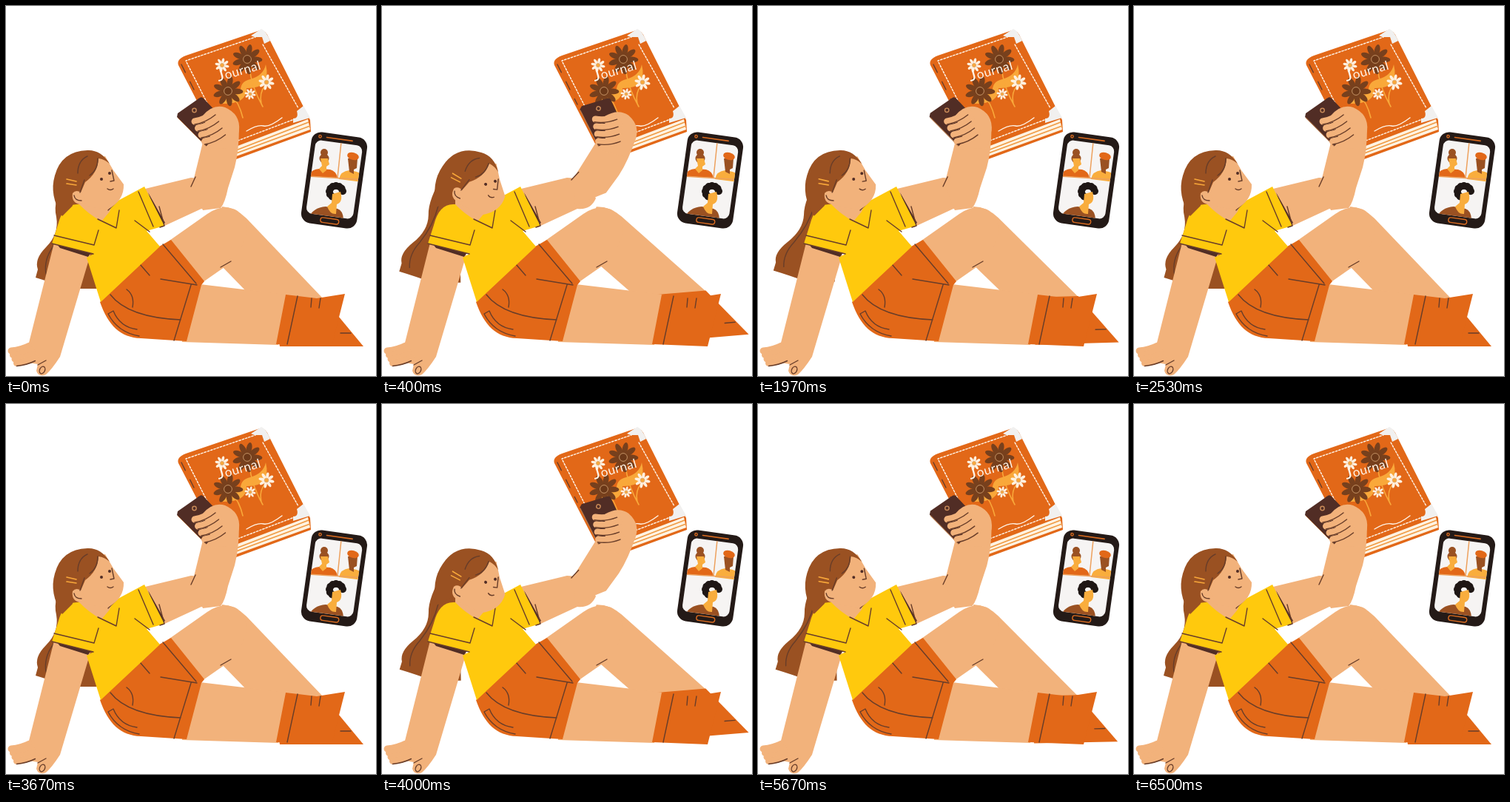
These frames come from a looping animation (500x500 px, 7.21 s). An HTML page:

```html
<!DOCTYPE html>
<html lang="en">
<head>
<meta charset="utf-8">
<title>Journal</title>
<style>
html, body { margin: 0; width: 100%; height: 100%; overflow: hidden; background: #fff; }
svg { display: block; width: 100vw; height: 100vh; }
.skin { fill: #f2b27b; }
.orange { fill: #e26818; }
.yellow { fill: #ffc90d; }
.amber { fill: #f9ad3d; }
.hair { fill: #9a5122; }
.dark { fill: #512d25; }
.line, .white, .gold, .finger { fill: none; stroke-linecap: round; stroke-linejoin: round; }
.line { stroke: #683d29; stroke-width: 1.4; }
.white { stroke: #fff4e8; stroke-width: 1.4; }
.gold { stroke: #f9a83a; stroke-width: 1.6; }
.rust { stroke: #d96b20; }
.finger { stroke: #f2b27b; stroke-width: 9; }
</style>
</head>
<body>
<svg viewBox="0 0 500 500">
  <defs>
    <clipPath id="screen"><rect x="-32" y="-51" width="64" height="100" rx="8" transform="translate(443.500 235.500) rotate(8)"/></clipPath>
  </defs>

  <!-- journal -->
  <path class="orange" d="M233 80Q230 72 243 67L343 33Q351 32 355 43L411 154L412 170L311 207L290 190Z"/>
  <path fill="#fff3e2" d="M300 194L408 153L411 167L303 206Z"/>
  <path fill="none" stroke="#ef9a42" stroke-width="1.500" d="M303 198L409 157M303 202L411 162"/>
  <path class="line" stroke-dasharray="12 14" d="M237 79L264 133"/>
  <path class="white" stroke-dasharray="2.500 2" d="M298 183L243 74L337 42M347 52L395 138M387 154L300 187"/>
  <path fill="#f1f0ef" d="M331 40L345 31Q351 33 357 47L349 51L346 42L336 42ZM388 158V152Q396 152 393 142L402 135L411 151Z"/>
  <path fill="#f9a83a" d="M317 116Q316 102 330 99Q348 94 351 79Q359 112 325 111Q326 133 291 132Q298 112 317 116Z"/>
  <path class="gold" d="M329 82Q331 108 347 136M304 120Q315 130 320 151M350 108Q342 117 345 132"/>
  <g id="flowers"></g>
  <text transform="translate(287 102) rotate(-16)" font-family="Lato, sans-serif" font-size="17" letter-spacing=".5" fill="#fff4e8"><tspan font-size="24">J</tspan>ournal</text>
  <path class="white" d="M325 169Q340 160 348 162T373 151"/>

  <!-- video call -->
  <g transform="translate(443.500 235.500) rotate(8)">
    <rect x="-38" y="-62" width="76" height="124" rx="13" fill="#241a17"/>
    <rect x="-32" y="-51" width="64" height="100" rx="8" fill="#f6f4f3"/>
    <path class="gold rust" d="M-18-56H17"/>
    <circle class="line rust" cx="-27" cy="-56" r="1.700"/>
    <rect class="line rust" x="-11" y="52" width="25" height="6.500" rx="3.200"/>
  </g>
  <g clip-path="url(#screen)">
    <path class="orange" d="M408 230Q414 219 425 220L438 221Q446 223 448 232Z"/>
    <circle class="hair" cx="430" cy="198" r="5"/>
    <circle class="hair" cx="430" cy="206" r="6.500"/>
    <path class="amber" d="M425 206H435L437 214L433 217V222L428 226L423 220L427 216Z"/>
    <path class="amber" d="M450 234Q452 223 464 222L474 224Q483 227 483 238Z"/>
    <path class="hair" d="M462 206H475L474 219L470 221V227L464 224Z"/>
    <ellipse class="orange" cx="469" cy="203" rx="8" ry="5" transform="rotate(15 469 203)"/>
    <path d="M453 184L448 232M408 230L486 235" stroke="#eda05c" stroke-width="1.500"/>
    <path class="hair" d="M405 294Q412 272 432 271L448 274Q457 277 456 294Z"/>
    <g id="curls" fill="#1f1715"></g>
    <path class="amber" d="M441 254L452 251Q456 265 447 268L446 281Q438 282 434 271L440 266Z"/>
  </g>

  <path id="mane" class="hair"/>
  <path id="strand" class="line"/>

  <!-- legs -->
  <g id="calf">
    <path class="skin" d="M275 320L292 271Q310 272 325 287L430 397L358 420L290 350Z"/>
    <path class="orange" d="M358 396H430L483 460H370Z"/>
    <path class="line" d="M452 442H466"/>
  </g>
  <path class="skin" d="M218 319L272 281Q294 266 313 277Q340 303 305 346L262 376L380 390L368 458L238 454V376Z"/>
  <path class="orange" d="M378 390L420 395L458 389L440 460L365 457Z"/>
  <path class="line" d="M290 353L304 345M394 392L380 457M413 395L412 407M425 395L423 408"/>

  <!-- supporting arm -->
  <path class="skin" d="M65 320L114 336L73 474Q62 491 54 498Q44 502 41 493L43 484L20 480L31 455Z"/>
  <g id="restingHand"></g>
  <path class="line" d="M43 485L54 479"/>
  <ellipse class="line" cx="49" cy="492" rx="3.500" ry="5" transform="rotate(25 49 492)"/>
  <path class="dark" d="M68 321L115 333L111 339L73 327Z"/>

  <!-- upper arm, shorts and shirt -->
  <path class="skin" d="M188 247L250 232Q278 232 289 260Q282 276 264 274L210 299Z"/>
  <path class="dark" d="M192 252L215 293L208 298Z"/>
  <path class="orange" d="M207 325L223 316L268 372L264 377L244 453L182 449C155 448 138 432 127 400Z"/>
  <path class="line" d="M212 322L257 375M250 377L227 452M181 349L194 364M209 369L258 377M141 390Q165 421 236 424M163 383Q174 391 171 407M138 416L145 412Q154 434 177 437M138 416Q151 441 180 446"/>
  <path class="yellow" d="M62 321L70 296Q77 268 96 268L144 267L187 244L214 297L190 304L208 325L128 400L109 340L118 335Z"/>
  <path class="line" d="M65 310L119 323L125 303M179 251L199 298M174 290L194 305M207 271L214 297L208 299M62 321L118 335"/>
  <path class="skin" d="M99 262L147 258L140 278L129 291Q111 281 99 268Z"/>
  <path class="line" d="M124 288L149 300L153 276M149 265L138 276"/>

  <!-- head -->
  <g id="head">
    <path class="skin" d="M95 212L134 203L145 222L159 241Q160 263 137 275L105 271L90 256Z"/>
    <path class="hair" d="M76 284Q58 256 66 229Q75 196 110 195Q128 194 140 213Q133 207 125 206Q124 226 107 238L101 252L88 257L90 270Z"/>
    <path class="skin" d="M103 253Q95 247 90 253Q88 265 99 268L108 266Z"/>
    <path class="line" d="M102 263Q93 263 92 256M100 252L106 235M124 206Q124 222 113 229M110 203Q97 209 97 226M143 222L146 236L141 237M137 247Q141 250 145 247"/>
    <path class="gold" d="M82 234L95 237M82 240L95 242"/>
    <circle class="dark" cx="129" cy="234" r="2"/>
    <circle class="dark" cx="140" cy="226" r="2"/>
  </g>

  <!-- raised arm -->
  <g id="forearm">
    <path id="elbow" class="skin"/>
    <path class="line" d="M250 244L256 231"/>
    <path class="dark" d="M232 145L262 124Q265 122 268 126L306 166L276 191Q273 193 270 189L231 150Z"/>
    <path d="M232 151L272 191" stroke="#b77a4c"/>
    <circle class="line" cx="254.500" cy="141" r="2.700" style="stroke:#c98a58"/>
    <path class="skin" d="M266 194L278 182L266 148Q280 132 296 137Q317 146 315 168L309 192Z"/>
    <g id="raisedHand"></g>
  </g>
</svg>
<script>
const $ = id => document.getElementById(id);
const { sin, cos, min, max, PI } = Math;

function flower(x, y, r, n, color, heart) {
  let petals = '';
  for (let i = 0; i < n; i++)
    petals += `<ellipse cy="${-r * .6}" rx="${r * .19}" ry="${r * .42}" transform="rotate(${i * 360 / n + 12})"/>`;
  return `<g transform="translate(${x} ${y})" fill="${color}">${petals}<circle r="${r * .27}" fill="${heart}" stroke="#d9a877" stroke-width=".8"/></g>`;
}
const brown = (x, y) => flower(x, y, 20, 9, '#77401d', '#6b3818');
const cream = (x, y, r) => flower(x, y, r, 8, '#fff1df', '#f9a83a');
$('flowers').innerHTML = brown(326, 72) + brown(300, 115) +
  cream(292, 80, 9.5) + cream(352, 103, 10.5) + cream(330, 119, 7.5);

for (let a = 2.2; a < 6.4; a += .5)
  $('curls').innerHTML += `<circle cx="${446 + 9 * cos(a)}" cy="${251 + 8 * sin(a)}" r="5"/>`;

// Four stacked fingers, each with a crease along its lower side
function fingers(x, y, stepX, stepY, dx, dy) {
  let out = '';
  for (let i = 0; i < 4; i++) {
    const d = `M${x + i * stepX} ${y + i * stepY}q${dx * .55} ${dy * .2} ${dx} ${dy}`;
    out += `<path class="finger" d="${d}"/><path class="line" d="${d}" transform="translate(0 4)"/>`;
  }
  return out;
}
$('restingHand').innerHTML = fingers(7, 466, 2.5, 5.5, 25, -7);
$('raisedHand').innerHTML = fingers(255, 156, 4.5, 9, 28, -13);

// Hair hangs from the head; lower points swing further
function drawMane(swing) {
  const p = (x, y) => {
    const drop = min(1, max(0, (y - 268) / 90)) ** .7;
    return `${x - 50 * swing * drop} ${y - 25 * max(0, swing) * drop} `;
  };
  $('mane').setAttribute('d', `M${p(84, 225)}Q${p(62, 262)}${p(68, 285)}Q${p(72, 308)}${p(54, 326)}` +
    `Q${p(38, 342)}${p(43, 356)}L${p(40, 367)}Q${p(60, 373)}${p(85, 382)}L${p(123, 382)}L${p(118, 330)}L112 240Z`);
  $('strand').setAttribute('d', `M76 270Q${p(78, 300)}${p(63, 326)}Q${p(51, 343)}${p(54, 362)}`);
}

const CYCLE = 3605, START = 70, MOVE = 2830;

function draw(now) {
  const t = min(MOVE, max(0, now % CYCLE - START)), p = t / MOVE;
  const fade = (1 - p) ** 3;
  const arm = 29 * fade * sin(2 * PI * t / 1800);
  const swing = 24 * p ** 1.8 * fade * sin(2 * PI * t / 1600);
  const leg = 6 * sin(PI * min(1, t / 2200) ** .65);
  const tip = 293 - max(0, arm) * 1.1;

  drawMane(swing);
  $('calf').setAttribute('transform', `rotate(${-leg} 295 300)`);
  $('head').setAttribute('transform', `rotate(${arm} 113 272)`);
  $('forearm').setAttribute('transform', `translate(0 ${1.4 * min(0, arm)}) rotate(${arm} 281 258)`);
  $('elbow').setAttribute('d', `M252 241L267 180L315 163Q315 195 309 218L300 246Q${tip + 3} 266 ${tip - 3} 273L266 276Z`);
  requestAnimationFrame(draw);
}
requestAnimationFrame(draw);
</script>
</body>
</html>
```
